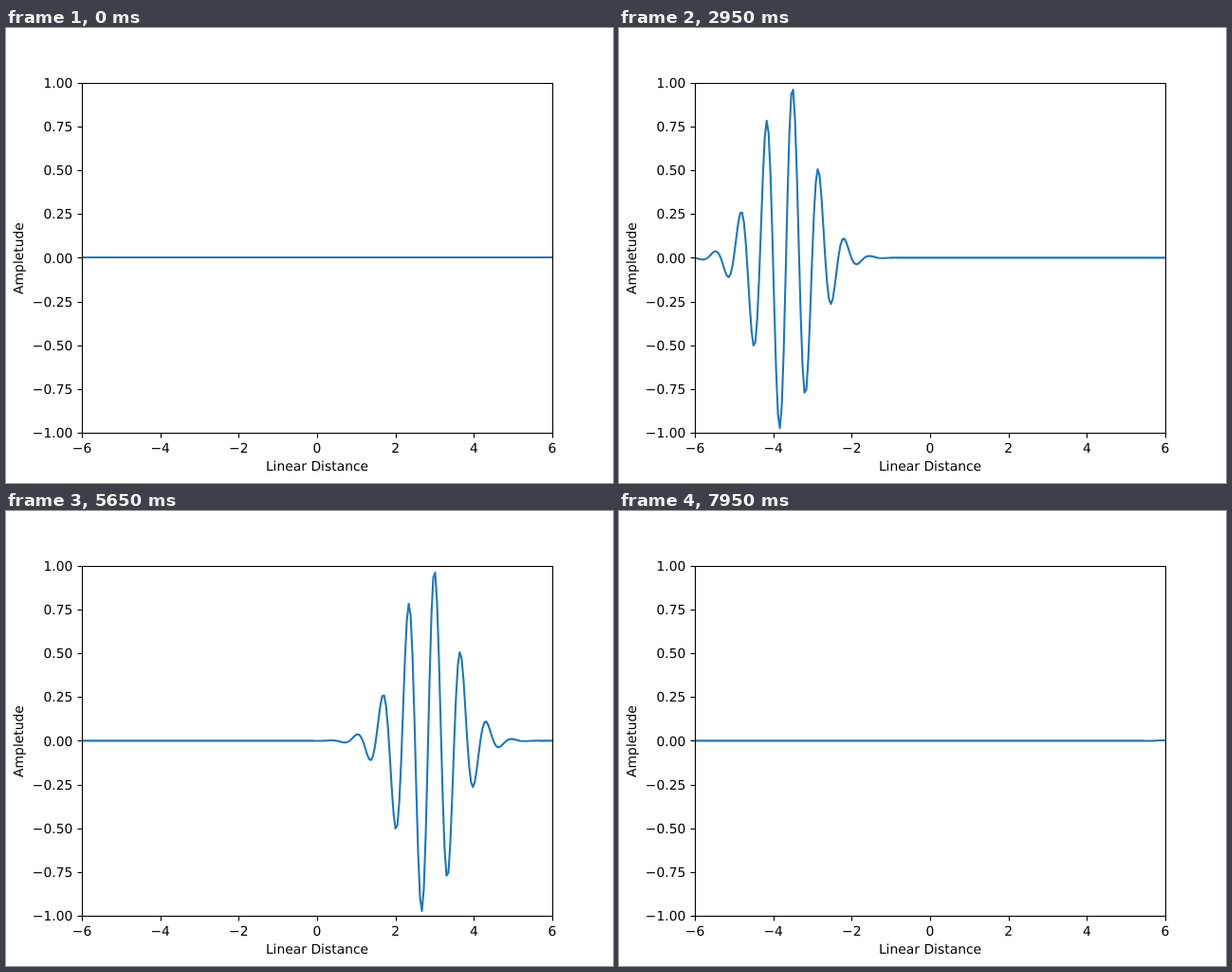
An HTML page for the animation above (8000 ms loop, 640 by 480 pixels).

```html
<!DOCTYPE html>
<html lang="en">
<head>
<meta charset="utf-8">
<title>Travelling wave packet</title>
<style>
  html, body { margin: 0; width: 100%; height: 100%; overflow: hidden; background: #fff; }
  svg { display: block; width: 640px; height: 480px; }
  text { font: 13.889px "DejaVu Sans", sans-serif; fill: #000; text-rendering: geometricPrecision; }
  .axis { fill: none; stroke: #000; stroke-width: 1.11; }
  #wave { fill: none; stroke: #1f77b4; stroke-width: 2.083; stroke-linejoin: round; stroke-linecap: square; }
</style>
</head>
<body>
<svg viewBox="0 0 640 480">
  <clipPath id="plot"><rect x="80" y="58" width="496" height="369"/></clipPath>
  <g id="ticks"></g>
  <g clip-path="url(#plot)"><path id="wave"/></g>
  <rect class="axis" x="80.5" y="58.5" width="496" height="369"/>
  <text x="328" y="467" text-anchor="middle">Linear Distance</text>
  <text transform="translate(18 243) rotate(-90)" text-anchor="middle">Ampletude</text>
</svg>
<script>
const LOOP = 8000, STEP = 50, QUIET = 10;
const POINTS = 250, DX = 12 / (POINTS - 1);
const px = x => 328 + x * 496 / 12;
const py = y => 242.4 - y * 184.8;
const snap = v => Math.floor(v + 0.5) + 0.5;
const minus = s => s.replace('-', '\u2212');

function add(tag, attrs, text = '') {
  const el = document.createElementNS('http://www.w3.org/2000/svg', tag);
  for (const name in attrs) el.setAttribute(name, attrs[name]);
  el.textContent = text;
  document.getElementById('ticks').append(el);
}

for (let x = -6; x <= 6; x += 2) {
  add('path', { class: 'axis', d: `M${snap(px(x))} 427.5v5` });
  add('text', { x: px(x), y: 448, 'text-anchor': 'middle' }, minus(String(x)));
}
for (let y = -1; y <= 1; y += 0.25) {
  add('path', { class: 'axis', d: `M80.5 ${snap(py(y))}h-5` });
  add('text', { x: 70.3, y: Math.round(py(y) + 5.25), 'text-anchor': 'end' }, minus(y.toFixed(2)));
}

const wave = document.getElementById('wave');
const pulse = u => Math.sin(3 * Math.PI * u) * Math.exp(-u * u);

// The packet moves 2.5 sample widths per step.
function wavePath(step) {
  if (step < QUIET) return 'M80 242H576';
  const center = 2.5 * step - 99.25;
  let d = '';
  for (let i = 0; i < POINTS; i++) {
    const y = py(pulse((i - center) * DX));
    d += `${i ? 'L' : 'M'}${px(-6 + i * DX).toFixed(3)} ${y.toFixed(3)}`;
  }
  return d;
}

let shown = -1;
function draw() {
  const step = Math.floor(performance.now() % LOOP / STEP);
  if (step !== shown) {
    shown = step;
    wave.setAttribute('d', wavePath(step));
  }
  requestAnimationFrame(draw);
}
draw();
</script>
</body>
</html>
```
